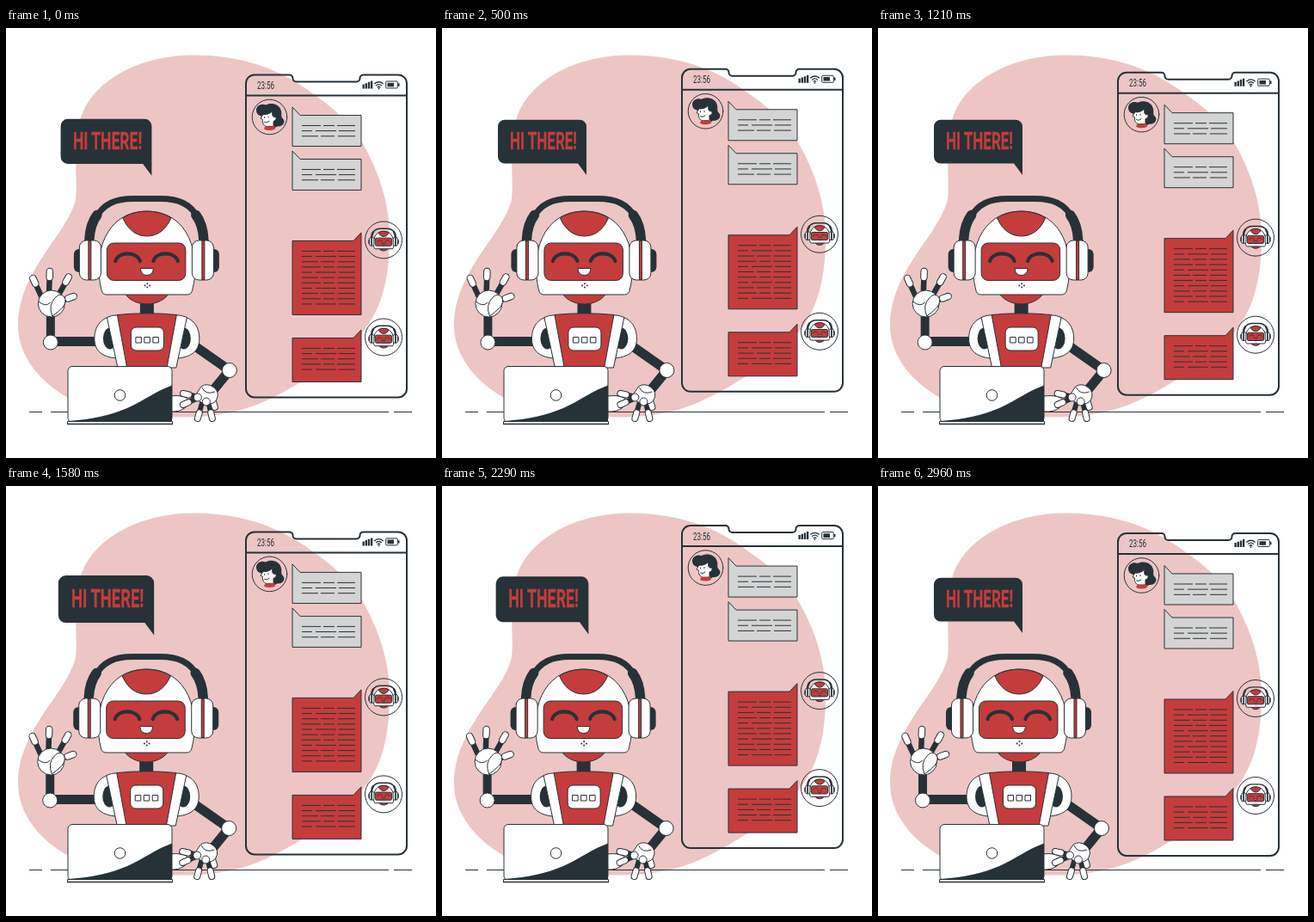
An HTML page for the animation above (3000 ms loop, 500 by 500 pixels).

```html
<!DOCTYPE html>
<html lang="en">
<head>
<meta charset="utf-8">
<title>Chat robot</title>
<style>
  html, body { margin: 0; width: 100%; height: 100%; overflow: hidden; background: #fff; }
  svg { display: block; width: 100vw; height: 100vh; }
  .line { fill: none; stroke: #263238; stroke-width: 1; }
  .thin { stroke: #263238; stroke-width: 1; vector-effect: non-scaling-stroke; }
  .white { fill: #fff; }
  .red { fill: #c53c3c; }
  .gray { fill: #d4d4d4; }
  .dark { fill: #263238; }
  .limb { fill: none; stroke: #263238; }
  .round { stroke-linecap: round; stroke-linejoin: round; }
  text { font-family: Roboto, "Liberation Sans", sans-serif; text-anchor: middle; }
</style>
</head>
<body>
<svg viewBox="0 0 500 500">
  <path fill="#edc5c5" d="M218 31.500C265 31.500 308 43 345 68C373 87 398 106 414 133C433 166 446 203 446 242C446 302 433 338 402 367C371 396 334 419 301 434C260 453 204 457 158 448C126 441 102 446 76 432C38 412 14 380 14 346C14 282 72 240 81 199C83 178 80 166 82 144C82 118 86 99 97 84C121 50 169 31.500 218 31.500Z"/>
  <path class="line" d="M27 446.500H42M52 446.500H445M451 446.500H472"/>

  <g id="phone">
    <path class="line" stroke-linejoin="round" style="stroke-width:2" d="M289 55H329.500A4 4 0 0 1 333.500 59A4 4 0 0 0 337.500 63H407.500A4 4 0 0 0 411.500 59A4 4 0 0 1 415.500 55H456A10 10 0 0 1 466 65V420A10 10 0 0 1 456 430H289A10 10 0 0 1 279 420V65A10 10 0 0 1 289 55ZM279 79H466"/>
    <text class="dark" font-size="13" transform="translate(302 71.500) scale(.62 1)">23:56</text>
    <path class="dark" d="M414.500 71V66H416.800V71ZM417.600 71V64.700H420V71ZM420.800 71V63.400H423.100V71ZM423.900 71V62H426.300V71Z"/>
    <path class="line" style="stroke-width:1.300" d="M428.300 65.500Q433.500 61 438.700 65.500M430 67.600Q433.500 64.600 437 67.600M431.700 69.600Q433.500 68 435.300 69.600"/>
    <circle class="dark" cx="433.500" cy="71" r=".9"/>
    <rect class="line" x="441.700" y="62.500" width="13.600" height="8" rx="1"/>
    <path class="dark" d="M443.500 64.200H451V68.800H443.500ZM456 64.800H457.500V68.200H456Z"/>

    <g class="round">
      <circle class="line" cx="306.500" cy="104" r="20.300"/>
      <path class="dark" d="M302 90C297 88 291 91 291 96C291 101 295 103 298 103L304 114C308 118 313 117 315 115C321 116 326 110 322 106C319 103 321 101 320 97C318 88 307 87 302 90Z"/>
      <path class="white thin" d="M299 101C304 102 308 99 310 97C309 101 310 104 312 104C315 103 315 108 311 109L311 115L303 115C299 114 298 110 298.500 107L296.500 106Z"/>
      <path class="red" d="M301 115.500C304 114 308 116 312 114L313 118Q306 121 300 118Z"/>
      <path class="line" d="M300.500 104V105M305 103.500V104.500M300.500 110Q303 112 306 109"/>
    </g>
    <g id="messages"></g>
    <circle class="line" cx="439" cy="247" r="21.500"/>
    <circle class="line" cx="439" cy="360" r="21.500"/>
    <use href="#head" transform="translate(404.700 192.200) scale(.21)"/>
    <use href="#head" transform="translate(404.700 305.200) scale(.21)"/>
  </g>

  <g id="bubble">
    <path class="dark" d="M73 106.700H160A8 8 0 0 1 168 114.700V171L158 157.500H73A8 8 0 0 1 65 149.500V114.700A8 8 0 0 1 73 106.700Z"/>
    <text class="red" font-size="27.500" font-weight="700" stroke="#c53c3c" stroke-width=".3" transform="translate(118 140.700) scale(.62 1)">HI THERE!</text>
  </g>

  <g id="robot">
    <path class="limb" stroke-width="11" d="M118 364.500H52"/>
    <path class="limb" stroke-width="10" d="M52 365V330"/>
    <path class="limb" stroke-width="11" d="M210 363L260 398L238 425"/>
    <circle class="white thin" cx="52" cy="365.500" r="8.500"/>
    <circle class="white thin" cx="260" cy="398" r="8.500"/>

    <g id="leftFingers"></g>
    <circle class="white thin" cx="53" cy="320.500" r="15.500"/>
    <path class="white thin" d="M54 335Q49 322 57 314Q63 307 68 313Q71 318 66 325Q60 331 54 335Z"/>
    <path class="line" d="M38 318Q46 325 52 319"/>

    <path class="white thin" d="M190 428Q208 426 212 432L209 441Q202 447 190 446Z"/>
    <g id="rightFingers"></g>
    <path class="white thin" d="M227 417Q234 412 242 418Q249 424 245 432Q242 438 233 437Q221 435 221 426Z"/>
    <circle class="white thin" cx="223" cy="429.500" r="4.500"/>
    <circle class="white thin" cx="233" cy="434.500" r="4.500"/>
    <path class="line" d="M228 418Q232 427 243 423"/>

    <g id="shoulder">
      <path class="white thin" d="M124 335.500C109 337 103 349 103 361C103 374 110 382 128 384Z"/>
      <ellipse class="dark" cx="121" cy="361" rx="8" ry="12.500"/>
      <path class="white thin" d="M132 333.500Q122 334 117.500 336.500L130 395H142Z"/>
    </g>
    <use href="#shoulder" transform="matrix(-1 0 0 1 328 0)"/>
    <path class="red thin" d="M129.500 333.500Q164 330 198.500 333.500L187 396H141Z"/>
    <rect class="white thin" x="145.500" y="348" width="38" height="27" rx="6"/>
    <path class="line" d="M151 359.500H157.500V366H151ZM161 359.500H167.500V366H161ZM171 359.500H177.500V366H171Z"/>
    <rect class="dark" x="156" y="316" width="16" height="16"/>

    <g id="head">
      <ellipse class="red thin" cx="164" cy="300" rx="28" ry="21"/>
      <path class="white thin" d="M117 310Q112 310 111 304C101 264 115 213 164 213C213 213 227 264 217 304Q216 310 211 310Z"/>
      <path class="red thin" d="M136 221C152 210.500 176 210.500 192 221C186 235 176 242 164 242C152 242 142 235 136 221Z"/>
      <rect class="red thin" x="117.500" y="250" width="91.500" height="43.500" rx="8"/>
      <path class="limb round" stroke-width="4.200" d="M127.500 271C131 259.500 152 259.500 156 271M171.500 271C175 259.500 196 259.500 200 271"/>
      <path class="white thin" d="M156.500 279.500H171.500Q171 287.500 164 287.500Q157 287.500 156.500 279.500Z"/>
      <g class="dark">
        <circle cx="164.500" cy="297.300" r="1"/><circle cx="161.700" cy="299.400" r="1"/>
        <circle cx="167.300" cy="299.400" r="1"/><circle cx="164.500" cy="301.500" r="1"/>
      </g>
      <path class="limb" stroke-width="7" d="M104 222C113 204 128 198.500 148 198.500H180C200 198.500 215 204 224 222"/>
      <g id="ear">
        <path class="limb round" stroke-width="11.500" d="M97 246Q98 228 106 217.500"/>
        <rect class="dark" x="79" y="257" width="14" height="27" rx="6"/>
        <rect class="white thin" x="85.500" y="247" width="25" height="46" rx="8"/>
        <rect class="red thin" x="96" y="247.500" width="3" height="45"/>
      </g>
      <use href="#ear" transform="matrix(-1 0 0 1 327 0)"/>
    </g>
  </g>

  <g id="laptop">
    <rect class="white thin" x="72" y="393.500" width="121" height="65" rx="5"/>
    <path class="dark" d="M73 457C101 455 122 450 141 442C161 433 175 422 193 415.500V458H73Z"/>
    <circle class="white thin" cx="132.500" cy="427" r="6.300"/>
    <rect class="white thin" x="71.500" y="457.500" width="122" height="3"/>
    <path class="line" style="stroke-width:1.600" d="M71 460.500H194"/>
  </g>
</svg>
<script>
const LOOP = 3000, LEAD = 40;
const byId = id => document.getElementById(id);

function message(top, height, rows, fromUser) {
  const outline = fromUser
    ? `M333 ${top - 9.5}L342 ${top}H413V${top + height}H333Z`
    : `M413 ${top - 9.5}L404 ${top}H333V${top + height}H413Z`;
  const dashes = ['22 3 13 3 22', '12 4 24 3 20', '19 3 16 4 22'];
  let out = `<path class="${fromUser ? 'gray' : 'red'} thin" d="${outline}"/>`;
  for (let i = 0; i < rows; i++) {
    out += `<path class="line" stroke-dasharray="${dashes[i % 3]}" d="M344 ${top + 12 + i * 6.15}H406"/>`;
  }
  return out;
}

// A dark joint from the palm with a white, rounded fingertip.
function finger([x, y, tipX, tipY], width) {
  const dx = tipX - x, dy = tipY - y, length = Math.hypot(dx, dy);
  const tip = `M${tipX} ${tipY}L${tipX - dx / length * 7} ${tipY - dy / length * 7}`;
  return `<path class="limb" stroke-width="${width - 1}" d="M${x} ${y}L${tipX} ${tipY}"/>
    <path class="limb round" stroke-width="${width + 1}" d="${tip}"/>
    <path class="round" stroke="#fff" stroke-width="${width - 1}" d="${tip}"/>`;
}

byId('messages').innerHTML =
  message(102, 36, 3, true) + message(153, 36, 3, true) +
  message(248, 86, 11, false) + message(361, 51, 5, false);

byId('leftFingers').innerHTML = [
  [43, 316, 31.5, 291], [50, 314, 51, 283], [58, 316, 73, 289.5], [60, 319, 79, 312]
].map(f => finger(f, 7.5)).join('');

byId('rightFingers').innerHTML = [
  [224, 429, 206, 425], [224, 430, 206, 438], [229, 433, 223, 454],
  [235, 433, 240, 454], [239, 428, 243, 441]
].map(f => finger(f, 7)).join('');

// Linear interpolation through [position, value] stops.
function track(stops, p) {
  const i = Math.max(1, stops.findIndex(s => s[0] >= p));
  const [p0, v0] = stops[i - 1], [p1, v1] = stops[i];
  return v0 + (v1 - v0) * (p - p0) / (p1 - p0);
}

const shake = [0, -1, 2, -4, 4, -4, 4, -4, 2, -1, 0].map((v, i) => [i / 10, v]);
const beat = [[0, 1], [.1, 1.1], [.3, 1], [.4, 1], [.5, 1.1], [.6, 1], [1, 1]];
const float = [[0, 0], [.5, -10], [1, 0]];

function render(ms) {
  const t = (ms + LEAD) % LOOP;
  const half = t % 1500 / 1500;
  byId('phone').setAttribute('transform', `translate(0 ${track(float, half)})`);
  byId('robot').setAttribute('transform', `translate(${track(shake, t / LOOP)} 0)`);
  byId('bubble').setAttribute('transform',
    `translate(116.5 139) scale(${track(beat, half)}) translate(-116.5 -139)`);
}

const start = performance.now();
function tick() {
  render(performance.now() - start);
  requestAnimationFrame(tick);
}
tick();
</script>
</body>
</html>
```
